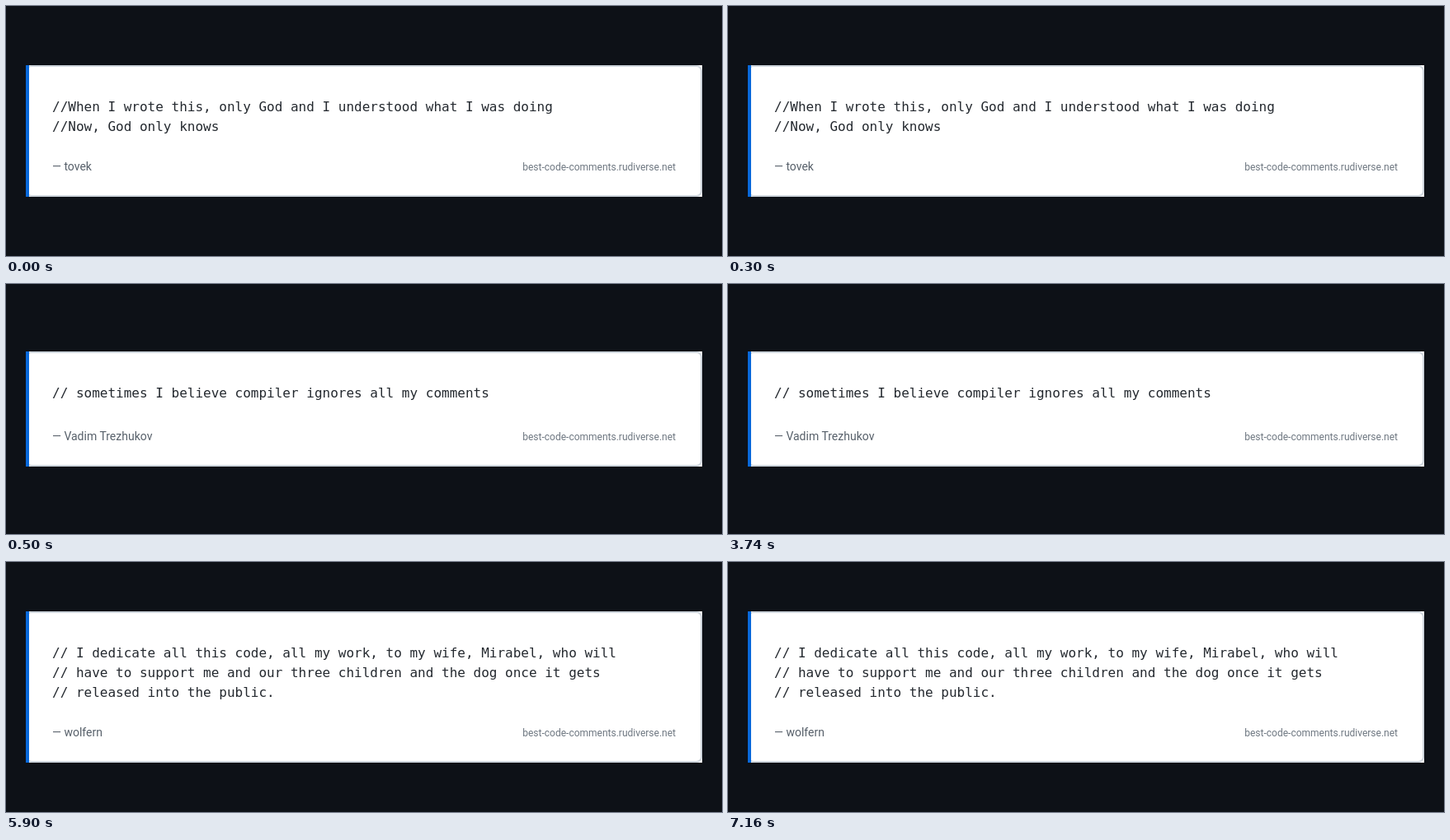
An HTML page for the animation above (8000 ms loop, 868 by 304 pixels).

```html
<!DOCTYPE html>
<html lang="en">
<head>
<meta charset="utf-8">
<title>Code comments</title>
<style>
  html, body { margin: 0; width: 100%; height: 100%; overflow: hidden; background: #0d1117; }
  svg { display: block; width: 868px; height: 304px; }
  .card { visibility: hidden; animation: 8s step-end infinite; }
  .first { animation-name: first; }
  .second { animation-name: second; }
  .third { animation-name: third; }
  @keyframes first { 0% { visibility: visible; } 6.25%, 100% { visibility: hidden; } }
  @keyframes second { 0% { visibility: hidden; } 6.25% { visibility: visible; } 73.75%, 100% { visibility: hidden; } }
  @keyframes third { 0% { visibility: hidden; } 73.75%, 100% { visibility: visible; } }
  .paper { fill: #fff; }
  .frame { fill: #fff; stroke: #d0d7de; stroke-width: 2; }
  .bar { fill: #0969da; }
  .code { font: 16px "DejaVu Sans Mono", monospace; fill: #24292f; }
  .author { font: 14px Roboto, sans-serif; fill: #57606a; }
  .site { font: 12px Roboto, sans-serif; fill: #6e7781; text-anchor: end; }
</style>
</head>
<body>
<svg id="stage" viewBox="0 0 868 304"></svg>
<script>
  const cards = [
    { name: "first", top: 72, height: 160, author: "tovek", lines: [
      "//When I wrote this, only God and I understood what I was doing",
      "//Now, God only knows"] },
    { name: "second", top: 82, height: 140, author: "Vadim Trezhukov", lines: [
      "// sometimes I believe compiler ignores all my comments"] },
    { name: "third", top: 60, height: 184, author: "wolfern", lines: [
      "// I dedicate all this code, all my work, to my wife, Mirabel, who will",
      "// have to support me and our three children and the dog once it gets",
      "// released into the public."] },
  ];

  const text = (style, x, y, content) =>
    `<text class="${style}" x="${x}" y="${y}">${content}</text>`;

  const drawCard = ({ name, top, height, author, lines }) => `
    <g class="card ${name}" transform="translate(24 ${top})">
      <rect class="paper" width="820" height="${height}"/>
      <rect class="frame" x="1" y="1" width="818" height="${height - 2}" rx="6"/>
      <rect class="bar" width="4" height="${height}"/>
      ${lines.map((line, i) => text("code", 32, 56 + 24 * i, line)).join("")}
      ${text("author", 32, height - 32, "— " + author)}
      ${text("site", 788, height - 32, "best-code-comments.rudiverse.net")}
    </g>`;

  document.getElementById("stage").innerHTML = cards.map(drawCard).join("");
</script>
</body>
</html>
```
